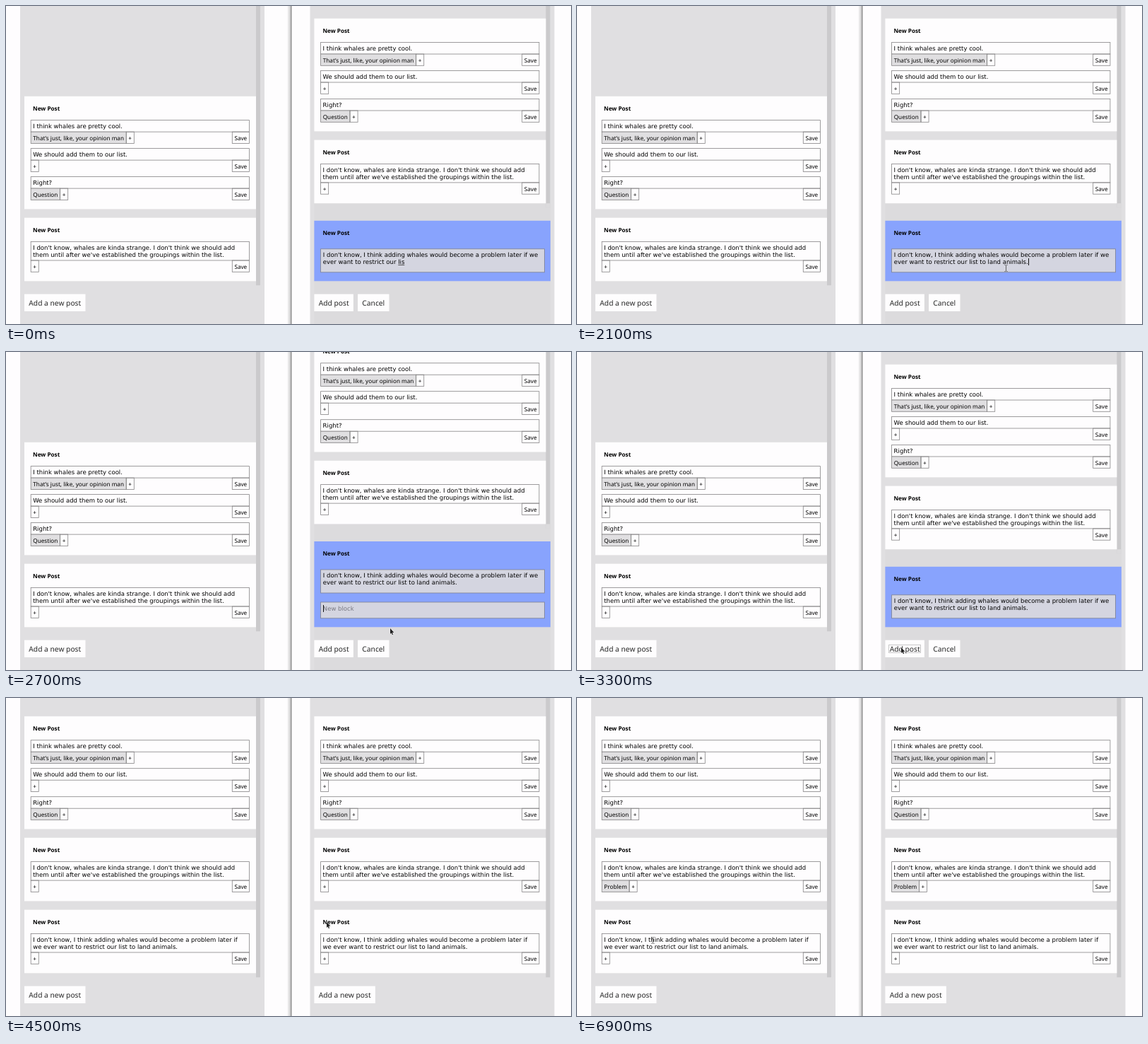
Write an HTML page with a canvas that moves like this. It is 800 px wide and 450 px high and loops after 7 s.

```html
<!DOCTYPE html>
<html lang="en">
<head>
<meta charset="utf-8">
<title>Two discussion windows</title>
<style>
html, body { margin: 0; width: 100%; height: 100%; overflow: hidden; background: #fefdfe; }
canvas { display: block; }
</style>
</head>
<body>
<canvas id="stage" width="800" height="450"></canvas>
<script>
const c = document.getElementById('stage').getContext('2d');
const LOOP = 7000, STEP = 100;
const BODY = '8.53px "DejaVu Sans", sans-serif';
const LABEL = '8.18px "Noto Sans", sans-serif';
const TITLE = 'bold ' + LABEL;
const BUTTON = '10.24px "Noto Sans", sans-serif';
const WHITE = '#fefdfe', PANEL = '#e0dfe1', LINE = '#858485';
const LEFT = 26, RIGHT = 436.4, BOTTOM = 389.3, GAP = 12.3;

const whales = [
  { lines: ['I think whales are pretty cool.'], tag: 'That\u2019s just, like, your opinion man' },
  { lines: ['We should add them to our list.'] },
  { lines: ['Right?'], tag: 'Question' }
];
const strange = ["I don't know, whales are kinda strange. I don't think we should add",
  "them until after we've established the groupings within the list."];
const posted = [{ lines: ["I don't know, I think adding whales would become a problem later if",
  'we ever want to restrict our list to land animals.'] }];
const draft = ["I don't know, I think adding whales would become a problem later if we",
  'ever want to restrict our list to land animals.'];

// Pointer stops: time, x, y
const stops = [[0, 700, 466], [500, 607, 371], [2400, 607, 371], [3100, 459, 418], [4100, 459, 418],
  [4700, 451, 267], [4900, 451, 267], [5200, 460, 271], [6600, 460, 271], [6900, 107, 343]];

function rect(x, y, w, h, color) {
  c.fillStyle = color;
  c.fillRect(x, y, w, h);
}

// Outline with a hairline centred on its edges
function box(x, y, w, h, fill, line = LINE) {
  if (fill) rect(x, y, w, h, fill);
  c.strokeStyle = line;
  c.lineWidth = .8;
  c.strokeRect(x, y, w, h);
}

// Draws text and returns its width
function text(s, x, y, font, color = '#000') {
  c.font = font;
  c.fillStyle = color;
  c.fillText(s, x, Math.round(y));
  return c.measureText(s).width;
}

function caret(x, y) {
  rect(Math.round(x), Math.round(y) - 8, 1, 10, '#111');
}

function cell(s, x, y, fill) {
  c.font = LABEL;
  const w = c.measureText(s).width + 6.4;
  box(x, y, w, 16.3, fill);
  text(s, x + 3.1, y + 11.7, LABEL);
  return w;
}

const blockHeight = b => 6.5 + 10 * b.lines.length;
const cardHeight = blocks => blocks.reduce((h, b) => h + blockHeight(b) + 23.5, 39.6);

function tagRow(block, x, y) {
  if (block.input != null) {
    box(x, y, 68, 16.3, WHITE);
    caret(x + 3.5 + text(block.input, x + 3.1, y + 11.7, LABEL), y + 11.7);
  } else {
    const w = block.tag ? cell(block.tag, x, y, PANEL) : 0;
    cell('+', x + w, y);
  }
  cell('Save', x + 285.1, y);
}

function card(x, y, blocks) {
  rect(x, y, 328, cardHeight(blocks), WHITE);
  text('New Post', x + 12, y + 20.3, TITLE);
  let top = y + 33.8;
  for (const b of blocks) {
    const h = blockHeight(b);
    box(x + 9.2, top, 309.3, h);
    b.lines.forEach((s, i) => text(s, x + 12.2, top + 11.5 + 10 * i, BODY));
    tagRow(b, x + 9.2, top + h);
    top += h + 23.5;
  }
}

// Cards stacked upwards from a bottom edge
function stack(x, bottom, cards) {
  rect(x + 328, 0, 6, bottom + 6, '#cbcacc');
  for (const blocks of [...cards].reverse()) {
    bottom -= cardHeight(blocks);
    card(x, bottom, blocks);
    bottom -= GAP;
  }
}

function button(s, x) {
  c.font = BUTTON;
  const w = c.measureText(s).width + 12.6;
  rect(x, 407.7, w, 24.3, WHITE);
  text(s, x + 6.3, 423.7, BUTTON, '#262626');
  return w;
}

function field(y, h) {
  box(RIGHT + 9.2, y, 316.8, h, '#d4d5e0', '#7d808f');
}

function composer(t) {
  const extra = t >= 2200 && t < 3200;
  const top = extra ? 268 : 303.8;
  rect(RIGHT, top - 24.6, 334.5, 475 - top, '#dcdbdd');
  rect(RIGHT, top, 334.5, BOTTOM - top, '#88a3fd');
  text('New Post', RIGHT + 12, top + 20.3, TITLE);
  field(top + 40, 33);

  const x = RIGHT + 12.4, y = top + 61.3;
  const count = t < 800 ? 29 : 34 + Math.round((t - 1000) * .0135);
  text(draft[0], x, top + 51.2, BODY);
  const end = x + text(draft[1].slice(0, count), x, y, BODY);
  if (t < 800) rect(end - 9, Math.round(y) + 1, 9, 1, '#555');
  else if (t < 2200) caret(end, y);
  if (extra) {
    field(354, 22.8);
    text('New block', x, 365.6, BODY, '#777780');
    caret(x, 365.6);
  }

  const w = button('Add post', RIGHT);
  button('Cancel', RIGHT + w + 6.2);
  if (t >= 3200) {
    c.setLineDash([1, 1]);
    box(RIGHT + 5.1, 414.5, 45, 11, null, '#777');
    c.setLineDash([]);
  }
  return top - 24.6;
}

function pointer(t) {
  const i = Math.max(1, stops.findIndex(s => s[0] >= t));
  const [t0, x0, y0] = stops[i - 1], [t1, x1, y1] = stops[i];
  const k = Math.min(1, (t - t0) / (t1 - t0));
  const x = x0 + (x1 - x0) * k, y = y0 + (y1 - y0) * k;
  const beam = t < 3000 ? y < 377 : t >= 4800 && t < 6400 || t >= 6900;
  c.save();
  c.translate(Math.round(x), Math.round(y));
  if (beam) {
    c.lineWidth = .8;
    c.strokeStyle = '#444';
    c.stroke(new Path2D('M.5-4V4M-1.5-4.5H0M1-4.5H2.5M-1.5 4.5H0M1 4.5H2.5'));
  } else {
    const arrow = new Path2D('M0 0V8L1.7 6.4L2.9 9.2L4.1 8.7L3 5.9H5.4Z');
    c.lineWidth = .8;
    c.strokeStyle = '#fff';
    c.stroke(arrow);
    c.fillStyle = '#222';
    c.fill(arrow);
  }
  c.restore();
}

function windows() {
  rect(0, 0, 800, 450, WHITE);
  rect(20, 0, 346, 450, PANEL);
  rect(430.5, 0, 346, 450, PANEL);
  const shade = c.createLinearGradient(398, 0, 404, 0);
  shade.addColorStop(0, 'rgba(0,0,0,0)');
  shade.addColorStop(1, 'rgba(0,0,0,.25)');
  rect(398, 0, 5.5, 450, shade);
  rect(403.4, 0, 1, 450, '#666');
}

function draw(t) {
  windows();
  const second = [{ lines: strange, tag: t >= 6400 && 'Problem' }];
  const cards = [whales, second];
  if (t < 3400) {
    stack(LEFT, BOTTOM, cards);
    const bottom = composer(t);
    stack(RIGHT, bottom, cards);
    // The scroll track stops where the composer begins
    rect(RIGHT + 328, bottom, 6.5, 6.5, '#dcdbdd');
  } else {
    const typing = t >= 4800 && t < 6400;
    const input = 'Problem'.slice(0, Math.max(0, (t - 5400) / STEP));
    stack(LEFT, BOTTOM, [...cards, posted]);
    stack(RIGHT, BOTTOM, [whales, typing ? [{ lines: strange, input }] : second, posted]);
    button('Add a new post', RIGHT);
  }
  button('Add a new post', LEFT);
  pointer(t);
}

function tick() {
  const t = performance.now() % LOOP;
  draw(Math.floor(t / STEP) * STEP);
  requestAnimationFrame(tick);
}

c.textRendering = 'geometricPrecision';
tick();
</script>
</body>
</html>
```
